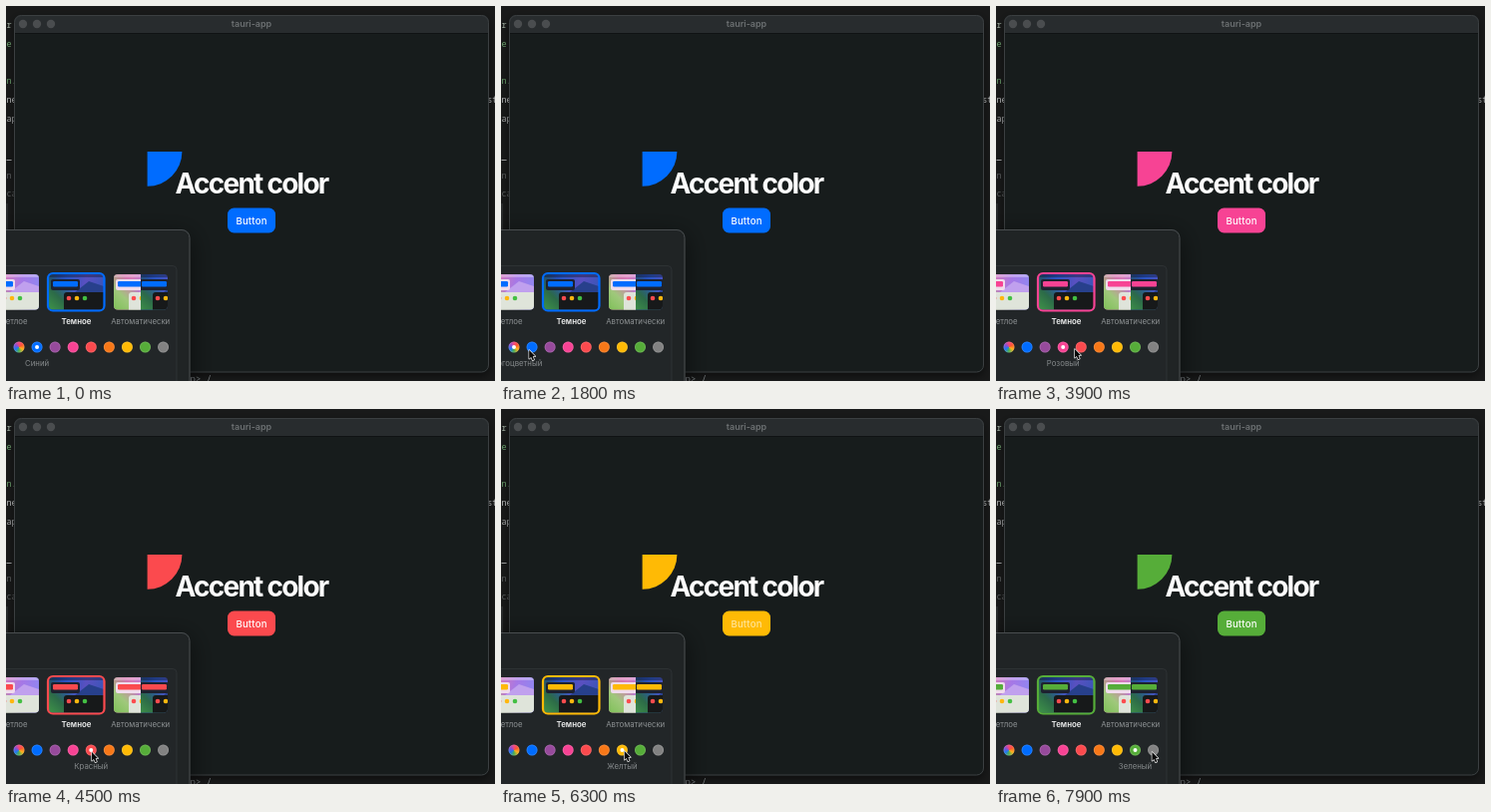
An HTML page with a canvas that plays this animation: 490x376 px, repeating every 8 s.

```html
<!DOCTYPE html>
<html lang="ru">
<head>
<meta charset="utf-8">
<title>Accent color</title>
<style>
html, body { margin: 0; width: 100%; height: 100%; overflow: hidden; background: #191a1a; }
canvas { display: block; width: 490px; height: 376px; }
</style>
</head>
<body>
<canvas id="stage"></canvas>
<script>
const W = 490, H = 376, LOOP = 8000;
const SANS = 'Inter, "Open Sans", sans-serif';
const MONO = '"Noto Sans Mono", "DejaVu Sans Mono", monospace';
const canvas = document.getElementById('stage');
const ctx = canvas.getContext('2d');
const dpr = window.devicePixelRatio || 1;
canvas.width = W * dpr;
canvas.height = H * dpr;

const SWATCHES = [
  ['Многоцветный', '#006cff'],
  ['Синий', '#006cff'],
  ['Лиловый', '#974a9c'],
  ['Розовый', '#f74394'],
  ['Красный', '#fb4a4e'],
  ['Оранжевый', '#f87818'],
  ['Желтый', '#ffba05'],
  ['Зеленый', '#56ad39'],
  ['Графитовый', '#828282']
].map(([name, color], i) => ({ name, color, x: 13 + 18.07 * i }));

// [time, swatch index]
const CLICKS = [[0, 1], [1050, 0], [1950, 1], [2450, 2], [3350, 3], [4250, 4], [5150, 5], [6050, 6], [6980, 7]];

// [time, x, y]
const PATH = [
  [0, 494, 16], [900, 12, 343], [1400, 13, 343], [1750, 27.5, 344], [2000, 30, 344],
  [2420, 47, 343], [2700, 49, 343], [3250, 66, 343], [3500, 67, 343], [3900, 78.5, 343],
  [4250, 84, 343], [4600, 86, 343], [5050, 103, 343], [5500, 105, 343], [6000, 122, 342],
  [6500, 124, 342], [6950, 139, 343], [7250, 140, 343], [7700, 156, 343], [8000, 156, 343]
];

function box(x, y, w, h, r, fill, stroke, line = 1) {
  ctx.beginPath();
  ctx.roundRect(x, y, w, h, r);
  if (fill) { ctx.fillStyle = fill; ctx.fill(); }
  if (stroke) { ctx.strokeStyle = stroke; ctx.lineWidth = line; ctx.stroke(); }
}

function disc(x, y, r, fill) {
  ctx.beginPath();
  ctx.arc(x, y, r, 0, Math.PI * 2);
  ctx.fillStyle = fill;
  ctx.fill();
}

function poly(points, fill) {
  ctx.beginPath();
  points.forEach(([x, y]) => ctx.lineTo(x, y));
  ctx.closePath();
  ctx.fillStyle = fill;
  ctx.fill();
}

function text(str, x, y, font, fill, align = 'center', spacing = 0) {
  ctx.font = font;
  ctx.textAlign = align;
  ctx.letterSpacing = spacing + 'px';
  ctx.fillStyle = fill;
  ctx.fillText(str, x, y);
}

function gradient(x0, y0, x1, y1, colors) {
  const g = ctx.createLinearGradient(x0, y0, x1, y1);
  colors.forEach((c, i) => g.addColorStop(i / (colors.length - 1), c));
  return g;
}

function editor() {
  ctx.fillStyle = '#191a1a';
  ctx.fillRect(0, 0, W, H);
  const rows = [['r', 22, '#a9b8aa'], ['e', 41, '#70a872'], ['n.', 78, '#70a872'], ['ne', 97, '#c4c6c7'],
    ['ap', 116, '#a9abac'], ['_', 153, '#d4d6d7'], ['n', 173, '#5d6061'], ['ca', 191, '#5d6061']];
  for (const [str, y, fill] of rows) text(str, 0.5, y, '8.5px ' + MONO, fill, 'left');
  text('st', 482.5, 97, '8px ' + MONO, '#c4c6c7', 'left');
  text('p> /', 184.5, 376.5, '9px ' + MONO, '#8b9194', 'left');
  ctx.fillStyle = '#292b2c';
  ctx.fillRect(0, 198, 2, 26);
}

function appWindow(accent) {
  ctx.save();
  ctx.shadowColor = 'rgba(0,0,0,.5)';
  ctx.shadowBlur = 9 * dpr;
  ctx.shadowOffsetY = 3 * dpr;
  box(8, 9, 476, 358.5, 7, '#171c1c');
  ctx.restore();
  box(8, 9, 476, 18.5, [7, 7, 0, 0], '#282c2e');
  box(8.5, 9.5, 475, 357.5, 7, null, '#3b3f41');
  ctx.fillStyle = '#101314';
  ctx.fillRect(9, 27, 474, 1);
  for (const x of [17, 31, 45]) disc(x, 18, 4.2, '#4a4d4f');
  text('tauri-app', 246, 21.2, '600 9px ' + SANS, '#6c7072');

  ctx.beginPath();
  ctx.moveTo(141.6, 146);
  ctx.arc(141.6, 146, 34.8, 0, Math.PI / 2);
  ctx.fillStyle = accent;
  ctx.fill();
  text('Accent color', 169.5, 188, '700 28px ' + SANS, '#fdfdfd', 'left', -1.75);
  box(222, 202.5, 48, 25, 6.5, accent);
  const label = accent === SWATCHES[6].color ? '#ffe49a' : '#fff';
  text('Button', 246, 218.6, '500 9.6px ' + SANS, label, 'center', 0.2);
}

function wallpaper(x, dark) {
  const y = 269, w = 55, h = 36;
  ctx.fillStyle = dark
    ? gradient(x, y, x + w, y + 14, ['#1c3a8c', '#2b55c4', '#5a50c0', '#3a55b8'])
    : gradient(x, y, x + w, y + 14, ['#c96a9c', '#d77ab8', '#a678e6', '#8f86f0']);
  ctx.fillRect(x, y, w, h);
  ctx.fillStyle = dark
    ? gradient(x, y + h, x + 22, y + 12, ['#3f9448', '#2c6a48', '#2c6a4800'])
    : gradient(x, y + h, x + 22, y + 12, ['#7fc158', '#a0c87c', '#a0c87c00']);
  ctx.fillRect(x, y, w, h);
  poly([[x + 26, y + 18], [x + 40, y + 7], [x + w, y + 12], [x + w, y + 22]], dark ? '#27408c' : '#c0a0ee');
}

// One miniature desktop, clipped to [left, left + width]
function desktop(x, dark, accent, left = x, width = 55, radius = 4) {
  ctx.save();
  ctx.beginPath();
  ctx.roundRect(left, 269, width, 35.5, radius);
  ctx.clip();
  wallpaper(x, dark);
  ctx.fillStyle = dark ? 'rgba(15,20,35,.4)' : 'rgba(255,255,255,.3)';
  ctx.fillRect(x, 269, 55, 3);
  box(x + 2, 274, 29, 11, 2, dark ? '#1e2230' : '#f0dcec');
  box(x + 4, 276, 25, 5.5, 1.2, accent);
  box(x + 15, 287, 45, 24, 3, dark ? '#17191a' : '#dfe4da');
  ['#fc4c4e', '#ffb70f', '#43bf43'].forEach((c, i) => disc(x + 20 + 8 * i, 293, 2.3, c));
  ctx.restore();
}

function wheel(x, y, r) {
  const g = ctx.createConicGradient(-Math.PI / 2, x, y);
  ['#f5457c', '#fb5a2c', '#ffb01c', '#4bb050', '#1f78f5', '#8a4fd0', '#f5457c']
    .forEach((c, i) => g.addColorStop(i / 6, c));
  disc(x, y, r, g);
}

function settings(selected) {
  const { name, color, x: labelX } = SWATCHES[selected];
  ctx.save();
  ctx.shadowColor = 'rgba(0,0,0,.55)';
  ctx.shadowBlur = 24 * dpr;
  ctx.shadowOffsetY = 6 * dpr;
  box(-30, 224, 214.5, 190, 8, '#202425');
  ctx.restore();
  box(-30, 224.5, 214, 190, 8, null, '#4a4e50');
  box(-30, 260.5, 201, 150, 4, '#222628', '#2d3234');

  desktop(-22, false, color);
  desktop(43, true, color);
  desktop(108, false, color, 108, 27, [4, 0, 0, 4]);
  desktop(132, true, color, 135, 27, [0, 4, 4, 0]);
  box(42, 268, 56.5, 37.5, 5, null, color, 2.2);

  const small = '7.8px ' + SANS;
  text('Светлое', 21.5, 318.5, small, '#8d9193', 'right');
  text('Темное', 70.5, 318.5, '600 7.9px ' + SANS, '#f0f1f1');
  text('Автоматически', 134.7, 318.5, small, '#8d9193');

  SWATCHES.forEach((s, i) => {
    if (i) disc(s.x, 342, 5.5, s.color);
    else wheel(s.x, 342, 5.5);
    ctx.beginPath();
    ctx.arc(s.x, 342, 5.1, 0, Math.PI * 2);
    ctx.strokeStyle = 'rgba(255,255,255,.18)';
    ctx.lineWidth = 0.8;
    ctx.stroke();
    if (i === selected) disc(s.x, 342, 2, '#fff');
  });
  text(name, labelX, 360.5, small, '#85898b');
}

function pointer(t) {
  const i = Math.max(1, PATH.findIndex(p => p[0] > t));
  const [t0, x0, y0] = PATH[i - 1], [t1, x1, y1] = PATH[i];
  const k = (t - t0) / (t1 - t0), e = k * k * (3 - 2 * k);
  ctx.save();
  ctx.translate(x0 + (x1 - x0) * e, y0 + (y1 - y0) * e);
  ctx.scale(0.85, 0.88);
  ctx.beginPath();
  [[0.5, 1], [0.5, 11], [2.8, 9], [4.5, 12.8], [6.3, 12], [4.7, 8.3], [7.7, 8.2]].forEach(p => ctx.lineTo(...p));
  ctx.closePath();
  ctx.lineJoin = 'round';
  ctx.strokeStyle = '#eee';
  ctx.lineWidth = 1.6;
  ctx.stroke();
  ctx.fillStyle = '#080808';
  ctx.fill();
  ctx.restore();
}

function draw(t) {
  const selected = CLICKS.filter(c => c[0] <= t).pop()[1];
  ctx.setTransform(dpr, 0, 0, dpr, 0, 0);
  editor();
  appWindow(SWATCHES[selected].color);
  settings(selected);
  pointer(t);
}

const start = performance.now();
function tick() {
  draw((performance.now() - start) % LOOP);
  requestAnimationFrame(tick);
}
tick();
</script>
</body>
</html>
```
